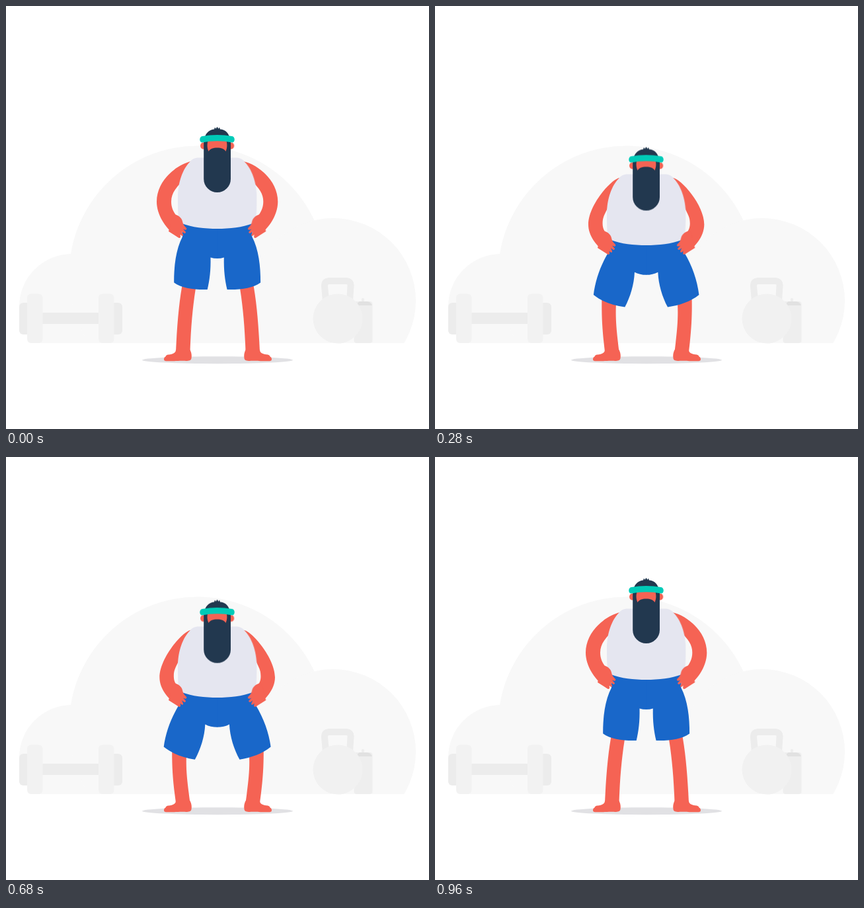
Recreate the animation shown at these times as an HTML page. Size 640 px wide and 640 px high, loop 1200 ms.

```html
<!DOCTYPE html>
<html lang="en">
<head>
<meta charset="utf-8">
<title>Squats</title>
<style>
  html, body { margin: 0; width: 100%; height: 100%; overflow: hidden; background: #fff; }
  svg { display: block; width: 100vw; height: 100vh; }
</style>
</head>
<body>
<svg viewBox="0 0 640 640" xmlns="http://www.w3.org/2000/svg">
  <defs>
    <clipPath id="ground"><rect width="640" height="510"/></clipPath>
  </defs>

  <g fill="#f8f8f8" clip-path="url(#ground)">
    <circle cx="100" cy="455" r="80"/>
    <circle cx="290" cy="406" r="194.5"/>
    <circle cx="495" cy="446" r="125"/>
  </g>

  <g fill="#ececec">
    <rect x="20" y="449" width="20" height="48" rx="6"/>
    <rect x="156" y="449" width="20" height="48" rx="6"/>
    <rect x="50" y="464" width="95" height="17"/>
  </g>
  <g fill="#f2f2f2">
    <rect x="32" y="435.5" width="23.5" height="74.5" rx="6"/>
    <rect x="140" y="435.5" width="23.5" height="74.5" rx="6"/>
  </g>

  <rect x="526.5" y="447" width="28" height="63" rx="4" fill="#eee"/>
  <path d="M535 447H547Q552 448 554 453H531Q531 449 535 447Z" fill="#e1e1e1"/>
  <rect x="538" y="442" width="4" height="5" rx="1.5" fill="#eee"/>
  <path d="M484 446L482 424Q481.500 416 489.500 416H514Q522 416 521.500 424L520 446" fill="none" stroke="#ececec" stroke-width="10"/>
  <circle cx="502" cy="473" r="37.500" fill="#f1f1f1"/>

  <ellipse cx="320" cy="535.700" rx="114" ry="5.500" fill="#e1e1e4"/>
  <g id="man"></g>
</svg>

<script>
const LOOP = 1200, STEP = 40, COUNT = 10;
const SKIN = '#f56354', BLUE = '#1967c9', SHIRT = '#e5e6f0', DARK = '#22384f', TEAL = '#00cbb8';
const BODY = 639.3, LEGS = 641;   // mirror widths
const man = document.getElementById('man');

// Squat depth: 0 standing, 1 lowest
const sink = x => 1 - (1 - x) ** 1.8;
const rise = x => x * x * (-0.15 + 2.48 * x - 1.33 * x * x);

const poses = [[0, 0]];
for (let k = 1; k <= COUNT; k++) poses.push([k * STEP, sink(k / COUNT)]);
for (let k = 1; k <= COUNT; k++) poses.push([560 + k * STEP, 1 - rise(k / COUNT)]);
poses.push([LOOP, 0]);

function blend(a, b, q) {
  const ends = b.match(/[\d.]+/g);
  let i = 0;
  return a.replace(/[\d.]+/g, n => (+n + (ends[i++] - n) * q).toFixed(2));
}

function animate(el, frameAt) {
  const frames = poses.map(([t, q]) => ({ offset: t / LOOP, easing: 'steps(1, end)', ...frameAt(q) }));
  el.animate(frames, { duration: LOOP, iterations: Infinity });
}

function add(parent, tag, attrs) {
  const el = document.createElementNS('http://www.w3.org/2000/svg', tag);
  for (const name in attrs) el.setAttribute(name, attrs[name]);
  return parent.appendChild(el);
}

// "to" is either a drop in pixels or the path of the lowest pose
function part(fill, from, to, parent = man) {
  const el = add(parent, 'path', { d: from, fill });
  if (typeof to === 'string') animate(el, q => ({ d: `path("${blend(from, to, q)}")` }));
  else if (to) animate(el, q => ({ transform: `translate(0px, ${(to * q).toFixed(2)}px)` }));
}

function pair(width, fill, from, to) {
  part(fill, from, to);
  part(fill, from, to, add(man, 'g', { transform: `matrix(-1 0 0 1 ${width} 0)` }));
}

// legs
pair(LEGS, SKIN,
  'M268 415C262 445 259 480 257 523L278.5 523C280 480 283 450 288.5 418Z',
  'M250.5 440C250.5 470 252 490 257 523L278.5 523C273 485 271 470 273 440Z');

// feet
pair(LEGS, SKIN,
  'M257 520C257 526 250 527 245 527.5C243 528 241.5 529 241.5 530.5C240 531 239 532.5 239 534.5' +
  'C239 537 241 537.2 244 537.3C256 537.6 262 536.5 268 536.8C275 537.2 280 537 280.5 533' +
  'C281.3 528 280.5 524 278.3 520Z', 0);

// shorts
pair(BODY, BLUE,
  'M266 327L320 327L320 382Q314 382 309.5 380.5C310 400 308 415 304.7 429C284 429.5 266 427 254.2 418.5C254 394 257 368 267 349L266 327Z',
  'M266 355L320 355L320 410Q309 410 301 405.5C300 424 294 443 285 459C267 456 251 450 238 439.5C241 418 249 397 261 377L266 355Z');

// arms
pair(BODY, SKIN,
  'M280 235C258 240 228 264 228 296C228 318 244 340 262 351L268 335L258 318C254 312 250 306 250 296C250 284 256 276 268 264Z',
  'M280 263C268 264 232.5 306 232.5 335C232.5 354 248 370 262 379L268 363L258 346C256 343 254 340 254 333C254 324 256 322 263 306Z');

// shirt
pair(BODY, SHIRT,
  'M320 229.5L292 229.5C285 229.5 281 232 278 236C268 246 260 266 260 290C260 300 260 312 261 322' +
  'Q262 327 266 329C282 335 300 337 320 337Z', 28.2);

// hands
pair(BODY, SKIN,
  'M253 315C259 315 266 320 267 326C267.5 330 270 333 273 336C274 338 272 339.5 270.5 338.5L268 337.5' +
  'L272 342C272 344 270 344.5 269 343.5L266 341L268 346C268.5 348 266.5 348.5 265 347L262.5 344.5' +
  'L264 348C264.5 350.5 263 351.5 261 350.5L246 341Z', 28.2);

// head
pair(BODY, SKIN, 'M299 206.5C292.5 206 292.5 217 299 216.5L302 216L302 207Z', 34);
part(DARK, 'M299.2 203H340V261.700A20.4 20.4 0 0 1 299.2 261.700Z', 31);
part(SKIN,
  'M306 202C304 209 304 214 306.5 220C309 216 313 214.5 319.5 214.5C326 214.5 330 216 332.5 220C335 214 335 209 333 202Z', 32.5);
part(DARK,
  'M301 198C303 191 309 187 315 186.5L316 183.5L317.5 185.8L319.5 182.8L321.5 185.8L323 183.5L324 186.5C331 187 336 191 338 198Z', 34.3);
part(TEAL,
  'M297 197Q319.500 193 342 197C347 197.500 347 206.500 342 206.500Q319.500 202 297 206.500C292 206.500 292 197.500 297 197Z', 34.3);
</script>
</body>
</html>
```
